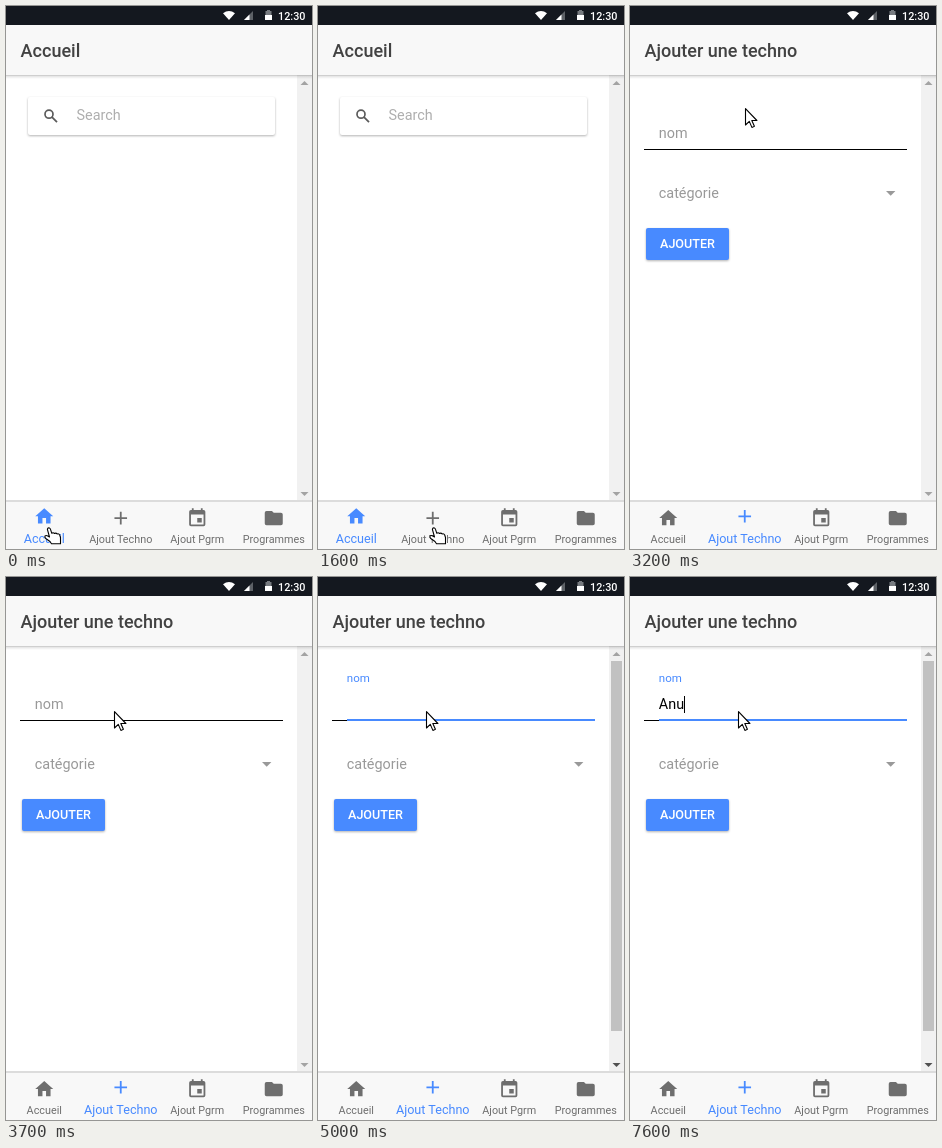
Write an HTML page that moves like this. It is 306x543 px and loops after 8000 ms.

```html
<!DOCTYPE html>
<html lang="fr">
<head>
<meta charset="utf-8">
<title>Ajouter une techno</title>
<style>
  html, body { margin: 0; width: 100%; height: 100%; overflow: hidden; background: #fff; }
  svg { display: block; width: 306px; height: 543px; font-family: Roboto, sans-serif; font-size: 14.4px; }
  .card { filter: drop-shadow(0 1px 1px rgba(0,0,0,.3)); }
  .hint { fill: #999; }
  .medium { font-weight: 500; }
  .tab text { text-anchor: middle; }
  .cursor { fill: #fff; stroke: #000; stroke-width: 1.1; stroke-linejoin: round; }
</style>
</head>
<body>
<svg viewBox="0 0 306 543">
  <defs>
    <linearGradient id="shade" x2="0" y2="1">
      <stop stop-opacity=".24"/><stop offset=".4" stop-opacity=".08"/><stop offset="1" stop-opacity="0"/>
    </linearGradient>
  </defs>
  <rect width="306" height="543" fill="#fff"/>

  <g id="home">
    <rect class="card" x="22" y="91" width="247" height="38" rx="2" fill="#fff"/>
    <g fill="none" stroke="#5b5b5b" stroke-width="1.7">
      <circle cx="43" cy="108.2" r="4"/><path d="M46 111.2l5 5"/>
    </g>
    <text x="70.5" y="114" fill="#aeaeae">Search</text>
  </g>

  <g id="form">
    <path d="M14 143.5H277" stroke="#000"/>
    <rect id="focusLine" x="29" y="142" width="248" height="2" fill="#488aff"/>
    <text id="label">nom</text>
    <text id="value" x="28.8" y="132"></text>
    <rect id="caret" y="119" width="1" height="17"/>
    <text class="hint" x="28.8" y="192">catégorie</text>
    <path class="hint" d="M256 185h9.4l-4.7 4.7z"/>
    <rect class="card" x="16" y="222" width="83" height="32" rx="2" fill="#488aff"/>
    <text class="medium" x="30" y="242.4" font-size="12.6" fill="#fff">AJOUTER</text>
  </g>

  <rect x="291" y="69" width="15" height="427" fill="#f1f1f1"/>
  <path d="M294.5 79h8l-4-4z" fill="#a3a3a3"/>
  <path id="scrollDown" d="M294.5 486h8l-4 4z"/>
  <rect id="thumb" x="293" y="84" width="11" height="370" fill="#c1c1c1"/>

  <rect y="69" width="306" height="4" fill="url(#shade)"/>
  <rect y="19" width="306" height="50" fill="#f8f8f8"/>
  <text id="title" class="medium" x="14.6" y="51" font-size="18" fill="#424242"></text>

  <rect width="306" height="19" fill="#14181f"/>
  <g fill="#fff">
    <path d="M217 7.2Q223 3 229 7.2L223 14z"/>
    <path d="M247 5v9h-9z" fill="#5d6166"/><path d="M243.5 8.5V14H238z"/>
    <path d="M259.500 5h1.500v-1h3v1h1.500v4h-6z" fill="#777b80"/><path d="M259 9h7v5h-7z"/>
    <text class="medium" x="272" y="13.500" font-size="10.8">12:30</text>
  </g>

  <rect y="494" width="306" height="2" fill="#dcdcdc"/>
  <rect y="496" width="306" height="47" fill="#f8f8f8"/>
  <g id="tabs"></g>

  <path id="hand" class="cursor" d="M3.400 2.300Q4 .5 5.400 1Q6.200 1.300 6.500 2.400L7.800 6.300Q9 5 10.500 6.500Q12 5.500 13.200 7Q14.800 6.300 15.700 8L16.500 10.500V16.800H7.500L6 14.500L1.800 11.500Q.2 10 1 9Q2 8 3.800 9L5.500 10z"/>
  <path id="arrow" class="cursor" d="M.5.7V17l3.800-3.600 2.600 6 2.500-1.100-2.600-5.800h5.100z"/>
</svg>

<script>
const $ = id => document.getElementById(id);
const BLUE = '#488aff';
const LOOP = 8000;

const tabs = [
  ['Accueil', 'M10 20v-6h4v6h5v-8h3L12 3 2 12h3v8z'],
  ['Ajout Techno', 'M19 13h-6v6h-2v-6H5v-2h6V5h2v6h6z'],
  ['Ajout Pgrm', 'M17 12h-5v5h5zM16 1v2H8V1H6v2H5a2 2 0 0 0-2 2v14a2 2 0 0 0 2 2h14a2 2 0 0 0 2-2V5a2 2 0 0 0-2-2h-1V1zM19 19H5V8h14z'],
  ['Programmes', 'M10 4H4a2 2 0 0 0-2 2v12a2 2 0 0 0 2 2h16a2 2 0 0 0 2-2V8a2 2 0 0 0-2-2h-8z']
];
$('tabs').innerHTML = tabs.map(([name, icon], i) => `
  <g class="tab" transform="translate(${38.25 + 76.5 * i})">
    <path d="${icon}" fill-rule="evenodd"/><text y="537">${name}</text>
  </g>`).join('');

// Pointer positions: [time, x, y], each held until the next
const handPath = [[0, 38, 521], [100, 58, 523], [200, 84, 526], [300, 104, 525],
  [400, 88, 523], [500, 62, 521], [600, 45, 520],
  [1300, 62, 520], [1400, 86, 521], [1500, 103, 521], [1600, 111, 521]];
const arrowPath = [[3100, 116, 300], [3200, 115, 102], [3300, 115, 100], [3400, 113, 107],
  [3500, 111, 118], [3600, 109, 129], [3700, 108, 134]];
const typed = [[0, ''], [5700, 'A'], [6200, 'An'], [7600, 'Anu']];
const caretX = { '': 29, A: 38, An: 46, Anu: 54 };

const latest = (steps, t) => steps.filter(s => s[0] <= t).pop();
const show = (id, on) => $(id).setAttribute('display', on ? 'inline' : 'none');

function drawTab(index, emphasis, selected) {
  const tab = $('tabs').children[index];
  const [icon, label] = tab.children;
  tab.setAttribute('fill', selected ? BLUE : '#6e6e6e');
  icon.setAttribute('transform', `translate(-10.8 ${501.3 - 1.8 * emphasis}) scale(.9)`);
  label.setAttribute('font-size', 10.8 + 1.8 * emphasis);
}

function drawPointer(t) {
  const moving = t >= 3100;
  const [, x, y] = latest(moving ? arrowPath : handPath, t);
  show('hand', !moving);
  show('arrow', moving);
  $(moving ? 'arrow' : 'hand').setAttribute('transform', `translate(${x} ${y})`);
}

function draw(t) {
  const onForm = t >= 2500;
  const focused = t >= 4400;
  const floating = t >= 4500;

  show('home', !onForm);
  show('form', onForm);
  $('title').textContent = onForm ? 'Ajouter une techno' : 'Accueil';

  const switching = Math.min(1, Math.max(0, (t - 2500) / 300));
  drawTab(0, 1 - switching, !onForm);
  drawTab(1, switching, onForm);
  drawTab(2, 0, false);
  drawTab(3, 0, false);

  show('focusLine', focused);
  show('thumb', focused);
  $('scrollDown').setAttribute('fill', focused ? '#505050' : '#a3a3a3');

  const [labelY, scale] = floating ? [105, .8] : focused ? [129.5, .98] : [132, 1];
  $('label').setAttribute('transform', `translate(28.8 ${labelY}) scale(${scale})`);
  $('label').setAttribute('fill', focused ? BLUE : '#999');

  const text = latest(typed, t)[1];
  const blinkStart = t < 5600 ? 4400 : t < 6200 ? 5600 : 6200;
  $('value').textContent = text;
  $('caret').setAttribute('x', caretX[text]);
  show('caret', focused && Math.floor((t - blinkStart) / 600) % 2 === 0);

  drawPointer(t);
}

function frame() {
  const t = performance.now() % LOOP;
  draw(Math.floor(t / 100) * 100);
  requestAnimationFrame(frame);
}
frame();
</script>
</body>
</html>
```
